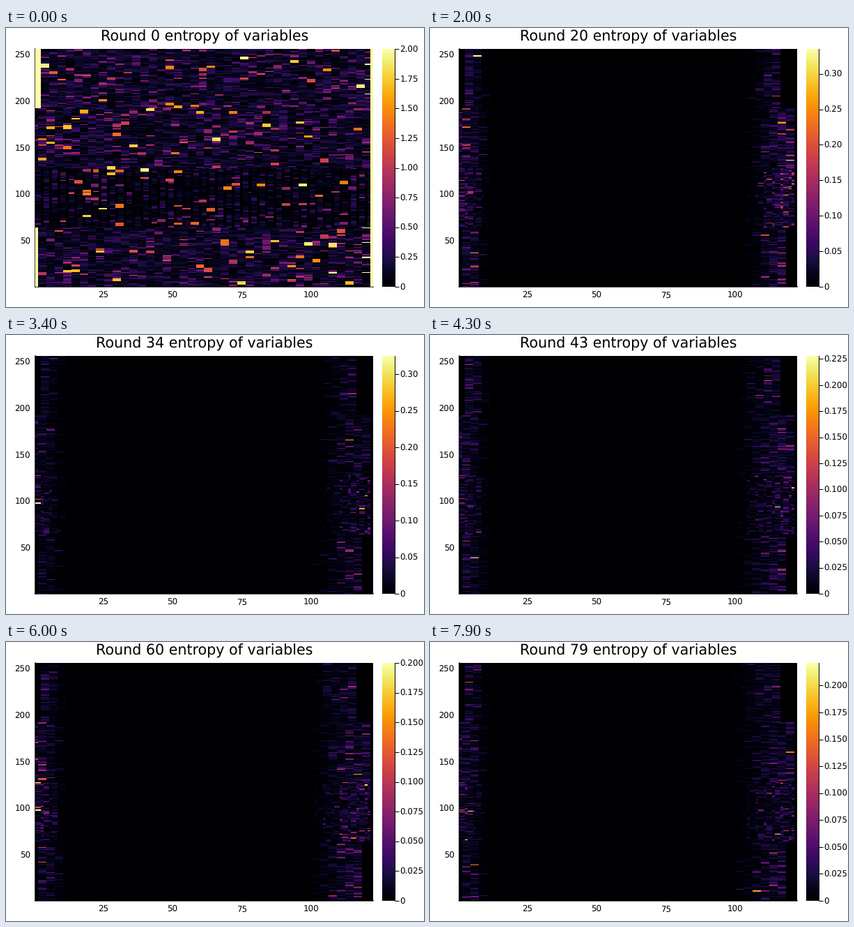
Recreate the animation shown at these times as a matplotlib script. Size 600 px wide and 400 px high, loop 8000 ms.

```python
import numpy as np
import matplotlib.pyplot as plt
from matplotlib.animation import FuncAnimation

W, H, DPI = 600, 400, 100
ROWS, COLS, ROUNDS = 256, 122, 80
PX = 72 / DPI  # points per pixel
TICK = 11.85 * PX

plt.rcParams.update({"font.family": "DejaVu Sans", "text.hinting": "none"})

row = np.arange(1, ROWS + 1)[:, None]
col = np.arange(1, COLS + 1)[None, :]
quarter = (row - 1) // 64
shift = np.where(quarter % 2 == 1, 3, 2)
live = ((col >= np.choose(quarter, [2, 1, 1, 3]))
        & (col <= np.choose(quarter, [118, 121, 121, 116])))

# Cells are three columns wide; the second quarter splits off one column.
block = (col - shift + 3) // 3
center = 3 * block + shift - 2
split = (quarter == 1) & (col % 3 == 0)
N_BLOCKS = block.max() + 1
block = np.where(split, block + N_BLOCKS, block)
BASE = np.random.default_rng(7).standard_normal((ROWS, 2 * N_BLOCKS))


def peak(k):
    """Largest entropy of a round: a fast fall, then a slow uneven drift."""
    rounds = [0, 8, 20, 34, 43, 60, 68, 79]
    tops = [2, .855, .335, .325, .228, .2, .28, .221]
    return np.exp(np.interp(k, rounds, np.log(tops)))


def cell_noise(k):
    """Normal noise per cell, partly kept between rounds, in short row runs."""
    rng = np.random.default_rng(100 + k)
    fresh = rng.standard_normal(BASE.shape)
    runs = np.cumsum(rng.random(BASE.shape) < (.6 if k == 0 else .8), axis=0)
    fresh = np.take_along_axis(fresh, np.minimum(runs, ROWS - 1), axis=0)
    return np.take_along_axis(.55 * BASE + .835 * fresh, block, axis=1)


def add_blobs(v, count, rng):
    """Bright cells a few rows tall, most of them orange or red."""
    for _ in range(count):
        r = rng.integers(ROWS - 4)
        c = 3 * rng.integers(40) + shift[r, 0] - 1
        level = .3 + .7 * rng.random() ** 1.5
        v[r:r + rng.integers(2, 5), c:c + 3] = level


def first_round(middle):
    rng = np.random.default_rng(3)
    v = np.minimum(middle, .6)
    add_blobs(v, 150, rng)
    # Known variables at both sides.
    v[192:, :2] = 1
    v[:64, 0] = 1
    v[:, -1] = 1
    v[15:64:16, 118:121] = 1
    v[207:250:16, 119:121] = 1
    return v


def field(k):
    """Entropy of all variables as a share of the round's peak."""
    noise = cell_noise(k)
    dim = np.where(quarter == 1, .65, 1) * np.where(split, .2, 1)
    middle = .06 * np.exp(.9 * noise - .28 * k) * dim
    if k == 0:
        return first_round(middle)
    reach = 10 + 5 * np.clip((k - 8) / 40, 0, 1)
    weight = (np.exp(-(np.abs(center) / 8) ** 3)
              + np.exp(-(np.abs(121 - center) / reach) ** 3))
    edge = weight * np.exp(.95 * noise) * live
    top = np.sort(np.unique(edge))[-4]
    return np.minimum(np.maximum(middle * live, .8 * edge / top), 1)


def bar_ticks(top):
    step, digits = next((s, d) for s, d in
                        ((.025, 3), (.05, 2), (.1, 1), (.25, 2))
                        if top / s < 9.3)
    values = step * np.arange(int(top / step + 1e-6) + 1)
    return values / top, ["0"] + [f"{t:.{digits}f}" for t in values[1:]]


def pixel_axes(x0, y0, x1, y1):
    return fig.add_axes([x0 / W, 1 - y1 / H, (x1 - x0) / W, (y1 - y0) / H])


fig = plt.figure(figsize=(W / DPI, H / DPI), dpi=DPI, facecolor="white")
ax = pixel_axes(42, 30, 527, 371)
cax = pixel_axes(540, 30, 558, 371)

heat = ax.imshow(field(0), cmap="inferno", vmin=0, vmax=1, origin="lower",
                 aspect="auto", interpolation="nearest", zorder=3,
                 extent=(.5, COLS + .5, .5, ROWS + .5))
ax.set_xticks([25, 50, 75, 100])
ax.set_yticks([50, 100, 150, 200, 250])
ax.tick_params(length=0, labelsize=TICK)
ax.tick_params(axis="x", pad=7.2 * PX)
ax.tick_params(axis="y", pad=7 * PX)
ax.spines[["top", "right"]].set_visible(False)
for side in ("left", "bottom"):
    ax.spines[side].set(linewidth=1.5 * PX, snap=False, zorder=2)

cax.imshow(np.linspace(0, 1, 256)[:, None], cmap="inferno", origin="lower",
           aspect="auto", extent=(0, 1, 0, 1))
cax.set_xticks([])
cax.yaxis.tick_right()
cax.tick_params(axis="y", length=5.5 * PX, width=PX, pad=2 * PX, labelsize=TICK)
cax.spines[["top", "left", "bottom"]].set_visible(False)
cax.spines["right"].set_linewidth(PX)

title = fig.text(285 / W, 1 - 19 / H, "", ha="center", va="baseline",
                 fontsize=20.7 * PX)


def update(k):
    heat.set_data(field(k))
    cax.set_yticks(*bar_ticks(peak(k)))
    cax.set_ylim(0, 1)
    title.set_text(f"Round {k} entropy of variables")
    return heat, title


anim = FuncAnimation(fig, update, frames=ROUNDS, interval=100, repeat=True,
                     blit=False)
plt.show()
```
